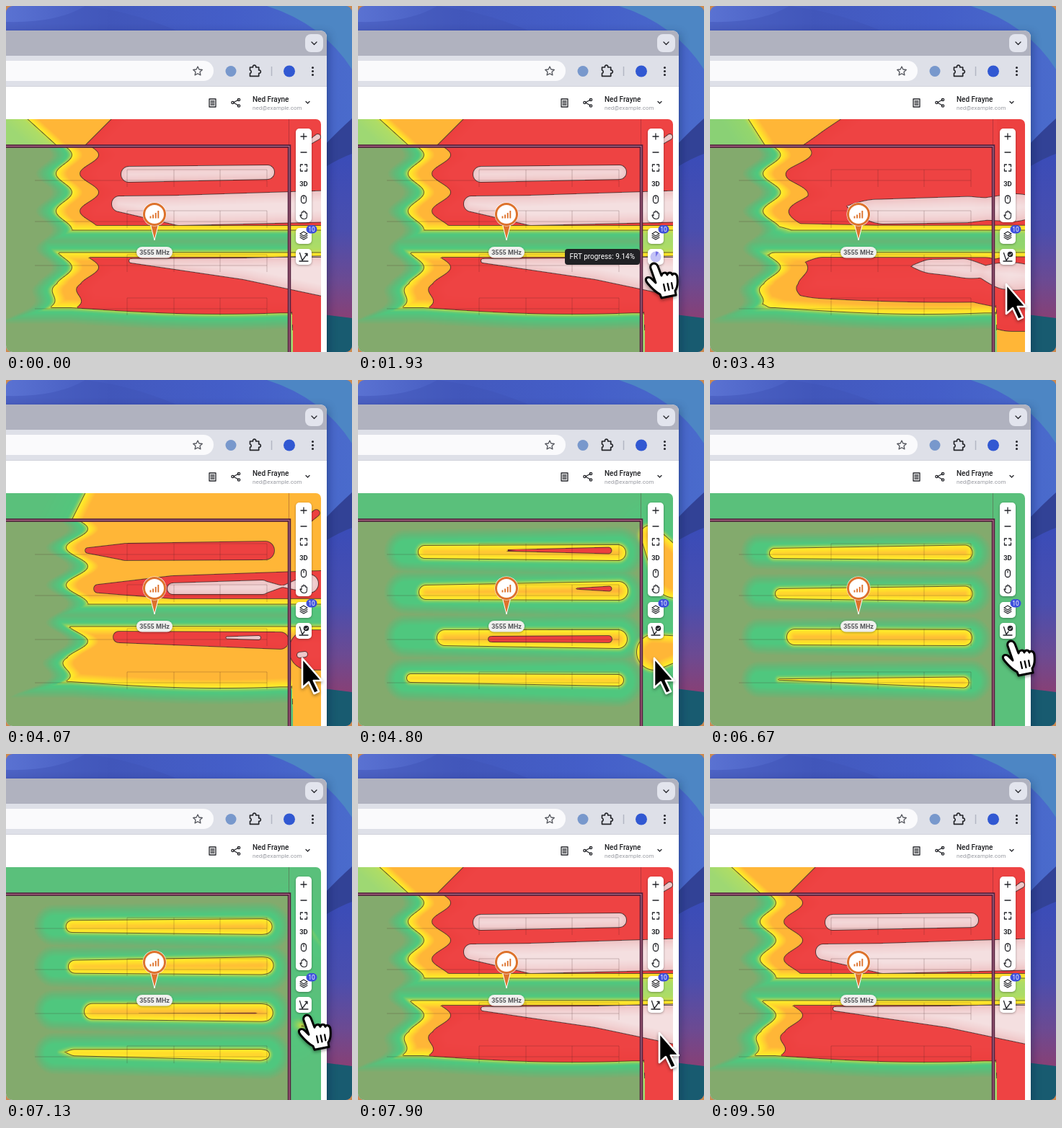
Recreate the animation shown at these times as an HTML page with a canvas. Size 480x480 px, loop 9.63 s.

```html
<!DOCTYPE html>
<html lang="en">
<head>
<meta charset="utf-8">
<title>Coverage map</title>
<style>
html, body { margin: 0; width: 100%; height: 100%; overflow: hidden; background: #cc8a50; }
#stage { position: relative; width: 480px; height: 480px; overflow: hidden; border-radius: 9px; font-family: Roboto, sans-serif; }
#stage > * { position: absolute; left: 0; top: 0; }
#stage > #map { top: 157px; border-top-right-radius: 7px; }
#stage > #tip { left: auto; right: 89px; top: 337px; height: 22px; padding: 0 7px; border-radius: 4px; background: #202124; color: #fff; font-size: 10px; line-height: 22px; white-space: nowrap; }
.ink { fill: none; stroke: #25262b; stroke-width: 1.3; stroke-linecap: round; stroke-linejoin: round; }
.card { fill: #fff; filter: drop-shadow(0 1px 1.5px #0005); }
</style>
</head>
<body>
<div id="stage">
  <svg width="480" height="480">
    <defs>
      <linearGradient id="sky"><stop offset="0" stop-color="#5a72d2"/><stop offset=".3" stop-color="#4359be"/><stop offset=".65" stop-color="#445ec8"/><stop offset="1" stop-color="#4a6bcc"/></linearGradient>
      <linearGradient id="side" x2="0" y2="1"><stop offset="0" stop-color="#3a4cb8"/><stop offset=".45" stop-color="#4a4eae"/><stop offset=".75" stop-color="#6c4a92"/><stop offset="1" stop-color="#8b3f72"/></linearGradient>
      <filter id="shade" x="-20%" width="140%"><feGaussianBlur stdDeviation="7"/></filter>
    </defs>
    <rect width="480" height="480" fill="url(#sky)"/>
    <path d="M110 0Q180 8 250 40H0V22Q70 24 110 0Z" fill="#4055b8" opacity=".5"/>
    <path d="M362 0Q440 25 480 88V0Z" fill="#4d86c4"/>
    <path d="M440 195Q462 172 480 156V250H440Z" fill="#324296"/>
    <path d="M440 225Q465 210 480 205V440H440Z" fill="url(#side)"/>
    <path d="M440 428L480 433V480H440Z" fill="#185b70"/>
    <path d="M-20 40H445V500H-20Z" fill="#101440" opacity=".5" filter="url(#shade)"/>
    <path d="M0 34H435Q445 34 445 44V480H0Z" fill="#fff"/>
    <path d="M0 34H435Q445 34 445 44V70H0Z" fill="#b0b2bf"/>
    <path d="M0 69H445V111H0Z" fill="#dee0e8"/>
    <path d="M0 111.500H445" stroke="#d2d4dc"/>
    <path d="M0 76H274A14 14 0 0 1 274 104H0Z" fill="#fafafc"/>
    <rect x="415" y="39" width="25" height="25" rx="8" fill="#e2e4ed"/>
    <path class="ink" d="M424 50l3.500 3.500 3.500-3.500"/>
    <path class="ink" d="M266 84l1.900 4 4.400.5-3.300 3 .9 4.400-3.900-2.200-3.900 2.200.9-4.400-3.300-3 4.400-.5z" style="stroke:#55575e"/>
    <circle cx="312" cy="90.500" r="7.500" fill="#7898cc"/>
    <path class="ink" d="M338.500 85h4a2.200 2.200 0 1 1 4.200 0h4v4a2.200 2.200 0 1 1 0 4.300v4h-12.200v-4a2.200 2.200 0 0 0 0-4.300z" style="stroke-width:1.700"/>
    <path d="M368.500 84v13" stroke="#b3b6c3" stroke-width="1.500"/>
    <circle cx="393" cy="90.500" r="8" fill="#3158d2"/>
    <g fill="#25262b"><circle cx="425.500" cy="85.500" r="1.500"/><circle cx="425.500" cy="90.500" r="1.500"/><circle cx="425.500" cy="95.500" r="1.500"/></g>
    <path class="ink" d="M282 129h9v11h-9zM284 132h5m-5 2.500h5m-5 2.500h5"/>
    <path class="ink" d="M315.500 134l7-4m-7 4l7 4"/>
    <g fill="#fff" class="ink"><circle cx="314.500" cy="134" r="1.700"/><circle cx="323" cy="130" r="1.700"/><circle cx="323" cy="138.500" r="1.700"/></g>
    <text x="342" y="133" font-size="10" font-weight="500" fill="#202124">Ned Frayne</text>
    <text x="342" y="144" font-size="8" fill="#9a9ca3">ned@example.com</text>
    <path class="ink" d="M416 132.500l2.500 2.500 2.500-2.500"/>
  </svg>
  <canvas id="map" width="437" height="323"></canvas>
  <svg width="480" height="480">
    <g fill="none">
      <path id="racks" stroke="#401c1c" stroke-opacity=".3" stroke-width=".8"/>
      <path d="M0 194.500H393V480" stroke="#53203e" stroke-width="4.500"/>
      <path d="M0 194.500H393V480" stroke="#b8748e" stroke-width="1.100"/>
      <path d="M392.500 157V194" stroke="#5a2030" stroke-opacity=".35"/>
    </g>
    <path d="M200 301L206 325L212 301Z" fill="#dd722c" stroke="#fff" stroke-width="1"/>
    <circle cx="206" cy="289" r="16.500" fill="#fff"/>
    <circle cx="206" cy="289" r="14.500" fill="#fff" stroke="#dd722c" stroke-width="3"/>
    <path d="M200.500 294.500v-3m3.600 3v-5m3.600 5v-7.500m3.600 7.500v-10.500" stroke="#dd722c" stroke-width="1.900"/>
    <rect class="card" x="181" y="334" width="50" height="15.500" rx="7.700" style="fill:#f0f0ee"/>
    <text x="206" y="345" font-size="9" font-weight="600" fill="#55565a" text-anchor="middle">3555 MHz</text>
    <rect class="card" x="402" y="170" width="22" height="130" rx="5"/>
    <rect class="card" x="402" y="308" width="22" height="22" rx="5"/>
    <rect class="card" x="402" y="337" width="22" height="22" rx="5"/>
    <path class="ink" d="M409 181h8m-4-4v8M409 203h8"/>
    <path class="ink" d="M408.500 223v-3h3m3 0h3v3m0 3v3h-3m-3 0h-3v-3"/>
    <text x="413" y="249.500" font-size="9.500" font-weight="700" fill="#25262b" text-anchor="middle">3D</text>
    <rect class="ink" x="409.500" y="263" width="7" height="10.500" rx="3.500"/><path class="ink" d="M413 265v2"/>
    <path class="ink" d="M410 291v-4.500q1-1.500 2 0v-1.500q1-1.500 2 0v1q1-1.300 1.800 0v1.500q1-1 1.700 0v4q0 4-4 4t-5.500-5q0-1.500 2 .5z" style="stroke-width:1.100"/>
    <path class="ink" d="M413 313l5 3-5 3-5-3zM408 318.500l5 3 5-3M408 321l5 3 5-3" style="stroke-width:1.100"/>
    <rect x="416.500" y="304" width="15" height="11.500" rx="5.700" fill="#3d4fdc"/>
    <text x="424" y="312.800" font-size="8.500" fill="#fff" text-anchor="middle">10</text>
    <path id="rays" class="ink" d="M407.500 342.500L411 353l7-9.500m-3 0h3v3M407 354h12"/>
    <g id="done"><path class="ink" d="M407.500 342.500L411 353l3-4M407 354h12"/><circle cx="416.500" cy="344.500" r="3.800" fill="#25262b"/><path d="M414.700 344.600l1.400 1.400 2.400-2.700" fill="none" stroke="#fff"/></g>
    <g id="pie"><circle cx="413" cy="348" r="7.500" fill="#c3c2f6"/><path id="slice" fill="#7774e6"/></g>
  </svg>
  <div id="tip"></div>
  <svg width="480" height="480" style="filter:drop-shadow(0 2px 2px #0006)">
    <path id="arrow" d="M0 0V41L9 33L16.500 49L23 46L15.800 31H27Z" stroke="#fff" stroke-width="2.600" stroke-linejoin="round"/>
    <g id="hand" stroke="#000" stroke-width="3" stroke-linejoin="round" stroke-linecap="round">
      <path d="M-5 6C-7-1 2-4 5 3L10 16C11 11 17 11 18 15C19 11 24 11 25 15C27 11 32 14 32 19C33 28 32 33 29 37L30 43L10 47L8 42C2 39-4 33-9 27C-15 20-9 16-4 20L2 26Z" fill="#fff"/>
      <path d="M13 28l2 9M18.500 27l2 9M24 26l1.500 8" fill="none" stroke-width="2.200"/>
    </g>
  </svg>
</div>
<script>
const LOOP = 9630, W = 437, H = 323, TOP = 157, CELL = 2, GW = 221, GH = 164;
const ROWS = [239, 296, 357, 417], WALL = { x: 393, y: 195 };
const $ = id => document.getElementById(id);
const clamp = v => Math.min(1, Math.max(0, v));
const smooth = u => u * u * (3 - 2 * u);

// Signed distances, negative inside.
// A bar from one round end to another, with its own radius at each end.
const bar = (x0, y0, r0, x1, y1, r1) => (x, y) => {
  const dx = x1 - x0, dy = y1 - y0;
  const u = clamp(((x - x0) * dx + (y - y0) * dy) / (dx * dx + dy * dy));
  return Math.hypot(x - x0 - u * dx, y - y0 - u * dy) - r0 - (r1 - r0) * u;
};
const any = (...shapes) => (x, y) => Math.min(...shapes.map(s => s(x, y)));
const none = () => 10;
const grow = (shape, r) => (x, y) => shape(x, y) - r;

// Everything right of a scalloped edge, with a clear aisle between rows 2 and 3.
// Inside the building the bottom is closed; beyond the wall it stays open.
function coverage(left, wave, skew, aisle) {
  const edge = y => y < WALL.y
    ? left - 8 + skew * (WALL.y - y)
    : left + wave * Math.cos((y - 206) / 52 * 2 * Math.PI) - (y > 385 ? (y - 385) * .9 : 0);
  return (x, y) => {
    const side = (edge(y) - x) * .8;
    const gap = aisle - Math.abs(y - 326);
    const floor = x > WALL.x + 3 ? -20 : y - 418 - 9 * Math.sin(clamp((x - 90) / 290) * 2.2);
    return Math.max(side, gap, floor);
  };
}

const weak = coverage(80, 11, -1.1, 15.5);
const fair = coverage(98, 15, .5, 15.5);
const barsC = any(
  bar(92, 238, 9, 360, 239, 11), bar(94, 294, 10, 361, 292, 13),
  bar(120, 357, 11, 360, 359, 13), bar(73, 413, 6, 360, 416, 8),
  bar(405, 215, 14, 440, 270, 32), bar(411, 377, 25, 440, 372, 18));
const barsD = any(
  bar(89, 240, 7, 353, 239, 10.5), bar(97, 296, 7, 353, 296, 10.5),
  bar(117, 356, 11, 352, 357, 11), bar(95, 415, .8, 351, 419, 7.5));
const halo = (x0, r) => any(...ROWS.map(y => bar(x0, y - 2, r * .7, 360, y, r)));

// Bands of each state: yellow, red, pink, green glow.
const states = [
  [weak, coverage(115, 13, 1, 22), any(
    bar(170, 233, 11, 362, 230, 10), bar(157, 274, 11, 240, 283, 21), bar(240, 283, 21, 460, 277, 22),
    bar(173, 353, 3, 330, 364, 15), bar(330, 364, 15, 440, 374, 28), bar(408, 197, 2, 432, 181, 4)), grow(weak, 7)],
  [fair, any(
    bar(113, 236, 4, 165, 238, 12), bar(165, 238, 12, 359, 236, 13), bar(127, 289, 6, 230, 287, 16), bar(230, 287, 16, 460, 283, 20),
    bar(156, 356, 8, 380, 361, 12), bar(420, 374, 28, 450, 374, 28), bar(410, 200, 5, 430, 184, 5)), any(
    bar(231, 289, 8, 355, 287, 10), bar(355, 287, 10, 383, 286, 1), bar(383, 286, 1, 420, 282, 13), bar(306, 357, 1.500, 350, 357, 3), bar(407, 381, 4, 414, 380, 4)), grow(fair, 7)],
  [barsC, any(bar(207, 236, 1, 347, 236, 4.500), bar(303, 289, .8, 348, 289, 3.500), bar(184, 359, 4, 347, 359, 5)), none, halo(66, 21)],
  [barsD, none, none, halo(68, 14)]
].map(bands => bands.map(shape => Float32Array.from({ length: GW * GH },
  (_, g) => shape(g % GW * CELL, TOP + Math.floor(g / GW) * CELL))));

const rgb = hex => [1, 3, 5].map(i => parseInt(hex.slice(i, i + 2), 16));
// Colour table by distance in quarter pixels, blending evenly up to the reach.
const fade = (reach, ...colours) => Array.from({ length: 161 }, (_, i) => {
  const u = clamp(i / 4 / reach) * (colours.length - 1), k = Math.min(colours.length - 2, Math.floor(u));
  const a = rgb(colours[k]), b = rgb(colours[k + 1]);
  return a.map((v, n) => v + (b[n] - v) * (u - k));
});
const indoor = fade(16, "#4fc77e", "#64b776", "#83aa6d");
const outdoor = fade(40, "#52c67d", "#5ac07b");
const early = fade(30, "#b2de62", "#9ed873");
const warm = fade(12, "#fff02e", "#ffe029", "#ffcb32", "#ffb637");
const red = fade(20, "#ec3f3e", "#ee4343");
const pink = fade(16, "#eec3c4", "#f2d3d4", "#f4dfe0");
const rim = rgb("#d3de40");
const pick = (table, d) => table[Math.max(0, Math.min(160, d * 4 | 0))];
const blend = (a, b, u) => a.map((v, n) => v + (b[n] - v) * u);

const ctx = $("map").getContext("2d"), img = ctx.createImageData(W, H);
const mixed = states[0].map(() => new Float32Array(GW * GH));
let shown = -1;

function drawMap(pos) {
  if (pos === shown) return;
  shown = pos;
  const k = Math.min(2, Math.floor(pos)), f = pos - k, start = Math.max(0, 1 - pos);
  mixed.forEach((m, b) => {
    const p = states[k][b], q = states[k + 1][b];
    for (let g = 0; g < m.length; g++) m[g] = p[g] + (q[g] - p[g]) * f;
  });
  const d = [0, 0, 0, 0];
  for (let y = 0, o = 0; y < H; y++) for (let x = 0; x < W; x++, o += 4) {
    const g = (y >> 1) * GW + (x >> 1), u = (x & 1) / 2, v = (y & 1) / 2;
    let line = 0;
    for (let b = 0; b < 4; b++) {
      const m = mixed[b], p = m[g], q = m[g + 1], r = m[g + GW], s = m[g + GW + 1];
      d[b] = (p + (q - p) * u) * (1 - v) + (r + (s - r) * u) * v;
      if (b < 3 && Math.abs(d[b]) < 2) {
        const slope = Math.max(.3, Math.hypot(q - p + s - r, r - p + s - q) / 4);
        line = Math.max(line, .72 * (1 - Math.abs(d[b]) / slope));
      }
    }
    let c;
    if (d[2] < 0) c = pick(pink, -d[2]);
    else if (d[1] < 0) c = pick(red, -d[1]);
    else if (d[0] < 0) c = pick(warm, -d[0]);
    else {
      c = y > WALL.y - TOP && x < WALL.x ? pick(indoor, d[3])
        : blend(pick(outdoor, d[0]), pick(early, d[0]), start);
      if (d[0] < 7) c = blend(c, rim, (1 - d[0] / 7) ** 2);
    }
    for (let n = 0; n < 3; n++) img.data[o + n] = c[n] + (38 - c[n]) * line;
    img.data[o + 3] = 255;
  }
  ctx.putImageData(img, 0, 0);
}

// Values between [time, ...values] keys.
function track(keys, t, ease = u => u) {
  const i = Math.max(0, keys.findLastIndex(key => t >= key[0]));
  const a = keys[i], b = keys[i + 1] || a;
  const u = b === a ? 0 : ease(clamp((t - a[0]) / (b[0] - a[0])));
  return a.slice(1).map((v, n) => v + (b[n + 1] - v) * u);
}
const mapKeys = [[3170, 0], [4070, 1], [4800, 2], [5700, 3], [6950, 3], [7750, 0]];
const cursorKeys = [[400, 424, 492], [1050, 413, 362], [1300, 411, 358], [2780, 411, 358], [3350, 411, 386],
  [6200, 411, 386], [6600, 418, 363], [7100, 418, 363], [7600, 418, 387], [7900, 418, 387], [8120, 418, 494]];

const columns = [168, 233, 297, 362];
$("racks").setAttribute("d", ROWS.map(y => `M40 ${y + 3}H362M168 ${y - 12}H362` +
  columns.map(x => `M${x} ${y - 12}v24`).join("")).join(""));

const show = (id, on) => { $(id).style.display = on ? "" : "none"; };

function draw(t) {
  drawMap(track(mapKeys, t)[0]);

  const busy = t >= 1130 && t < 2780, done = t >= 2780 && t < 6900;
  show("pie", busy);
  show("tip", busy);
  show("done", done);
  show("rays", !busy && !done);
  if (busy) {
    const part = clamp(Math.floor((t - 1130) / 160) / 10) ** 3.452;
    const a = Math.min(.9999, part) * 2 * Math.PI;
    $("tip").textContent = `FRT progress: ${(part * 100).toFixed(2)}%`;
    $("slice").setAttribute("d", `M413 348V340.5A7.5 7.5 0 ${a > Math.PI ? 1 : 0} 1 ${413 + 7.5 * Math.sin(a)} ${348 - 7.5 * Math.cos(a)}Z`);
  }

  const [x, y] = track(cursorKeys, t, smooth);
  show("hand", y < 370);
  show("arrow", y >= 370);
  for (const id of ["hand", "arrow"]) $(id).setAttribute("transform", `translate(${x} ${y})`);
}

const begin = performance.now();
function tick(now) {
  draw(Math.max(0, now - begin) % LOOP);
  requestAnimationFrame(tick);
}
draw(0);
requestAnimationFrame(tick);
</script>
</body>
</html>
```
